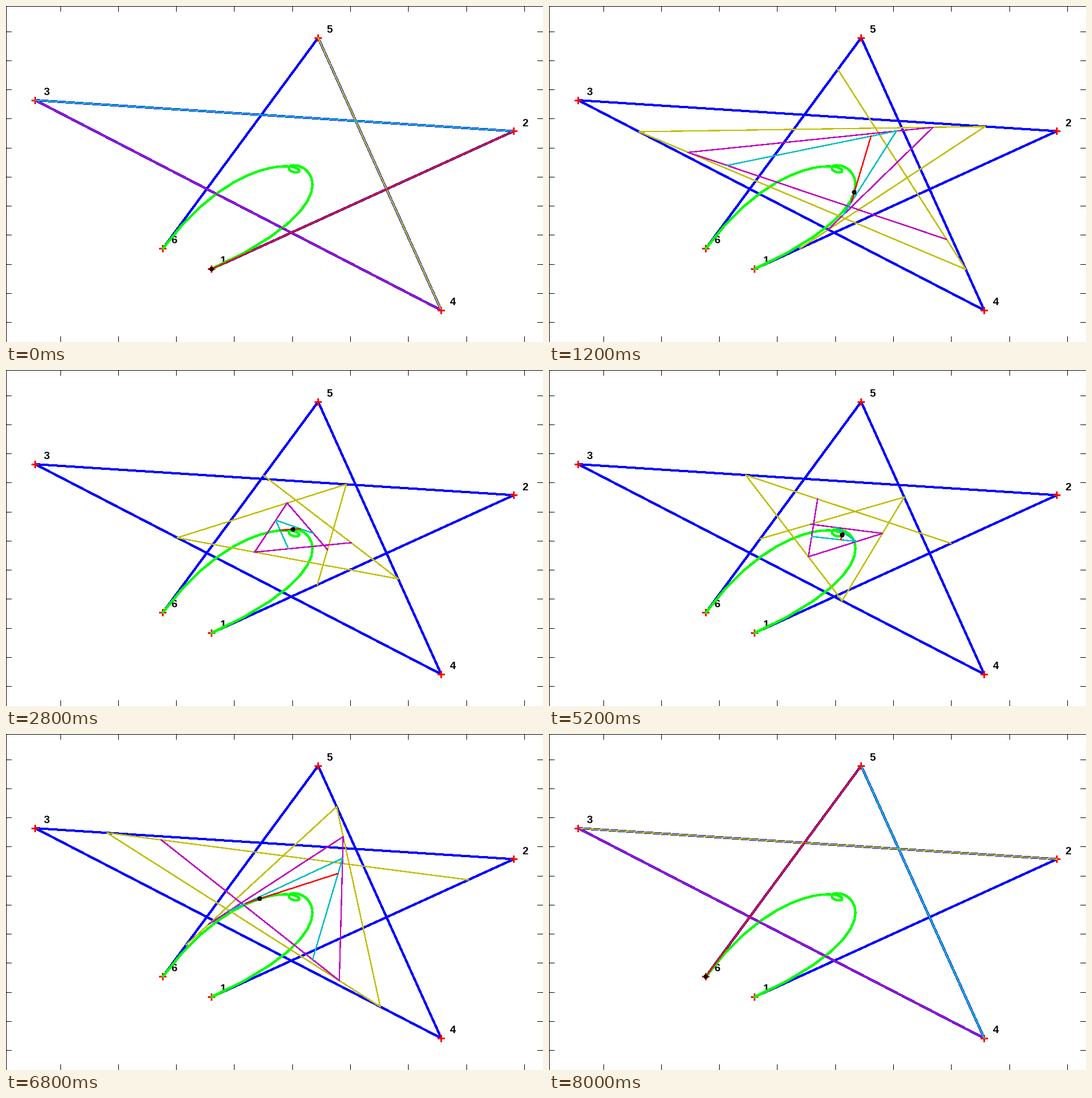
A matplotlib script for the animation above (8.2 s loop, 947x592 px).

```python
import numpy as np
import matplotlib.pyplot as plt
from matplotlib.animation import FuncAnimation
from matplotlib.patches import Circle

W, H, DPI = 947, 592, 64
STEPS = 40
PX = 72 / DPI  # points per pixel

# Coordinates are pixels; +0.5 puts a point on its pixel's centre
CTRL = np.array([(362, 463), (895, 220), (51, 165.5),
                 (767, 535.5), (550, 55.5), (276, 427)]) + 0.5
LEVEL_COLORS = [(.75, .75, 0), (.75, 0, .75), (0, .75, .75), (1, 0, 0)]


def casteljau(t):
    """All point sets of the construction, from control polygon to point."""
    levels = [CTRL]
    while len(levels[-1]) > 1:
        p = levels[-1]
        levels.append((1 - t) * p[:-1] + t * p[1:])
    return levels


fig = plt.figure(figsize=(W / DPI, H / DPI), dpi=DPI, facecolor="white")
ax = fig.add_axes([0, 0, 1, 1])
ax.set_xlim(0, W)
ax.set_ylim(H, 0)
ax.axis("off")


def line(pts, color, width, z, cap="round"):
    pts = np.asarray(pts, float)
    return ax.plot(pts[:, 0], pts[:, 1], color=color, lw=width * PX, zorder=z,
                   antialiased=False, snap=False,
                   solid_joinstyle="round", solid_capstyle=cap)[0]


def segment(x0, y0, x1, y1, color="black", width=1, z=1):
    line([(x0, y0), (x1, y1)], color, width, z, "butt")


# Top and left border with tick marks on all four sides
segment(0, 0.5, W, 0.5)
segment(0.5, 0, 0.5, H)
for k in range(9):
    x = round(95.6 + 102.3 * k) + 0.5
    segment(x, 0, x, 10)
    segment(x, H - 10, x, H)
for k in range(11):
    y = round(44.6 + 51.25 * k) + 0.5
    segment(0, y, 10, y)
    segment(W - 10, y, W, y)

line(CTRL, "blue", 3, 2)
for n, (x, y) in enumerate(CTRL, 1):
    ax.text(x + 15, y - 9, str(n), fontsize=18.7 * PX, zorder=3,
            family="Liberation Sans", weight="bold", va="baseline")
    cx, cy = np.floor((x, y)) + 0.5
    segment(cx - 6, cy, cx + 6, cy, "red", 1.4, 4)
    segment(cx, cy - 6, cx, cy + 6, "red", 1.4, 4)

curve = [casteljau(t)[-1][0] for t in np.linspace(0, 1, STEPS + 1)]
line(curve, "lime", 3.2, 5)

rungs = [line(CTRL[:1], c, 1.3, 6 + i) for i, c in enumerate(LEVEL_COLORS)]
dot = ax.add_patch(Circle(CTRL[0], 2.5, fill=False, ec="black", lw=2 * PX,
                          antialiased=False, zorder=12))


def update(i):
    levels = casteljau(i / STEPS)
    for rung, pts in zip(rungs, levels[1:]):
        rung.set_data(pts[:, 0], pts[:, 1])
    dot.center = levels[-1][0]
    return rungs + [dot]


anim = FuncAnimation(fig, update, frames=STEPS + 1, interval=200,
                     repeat=True, repeat_delay=0, blit=False)
plt.show()
```
